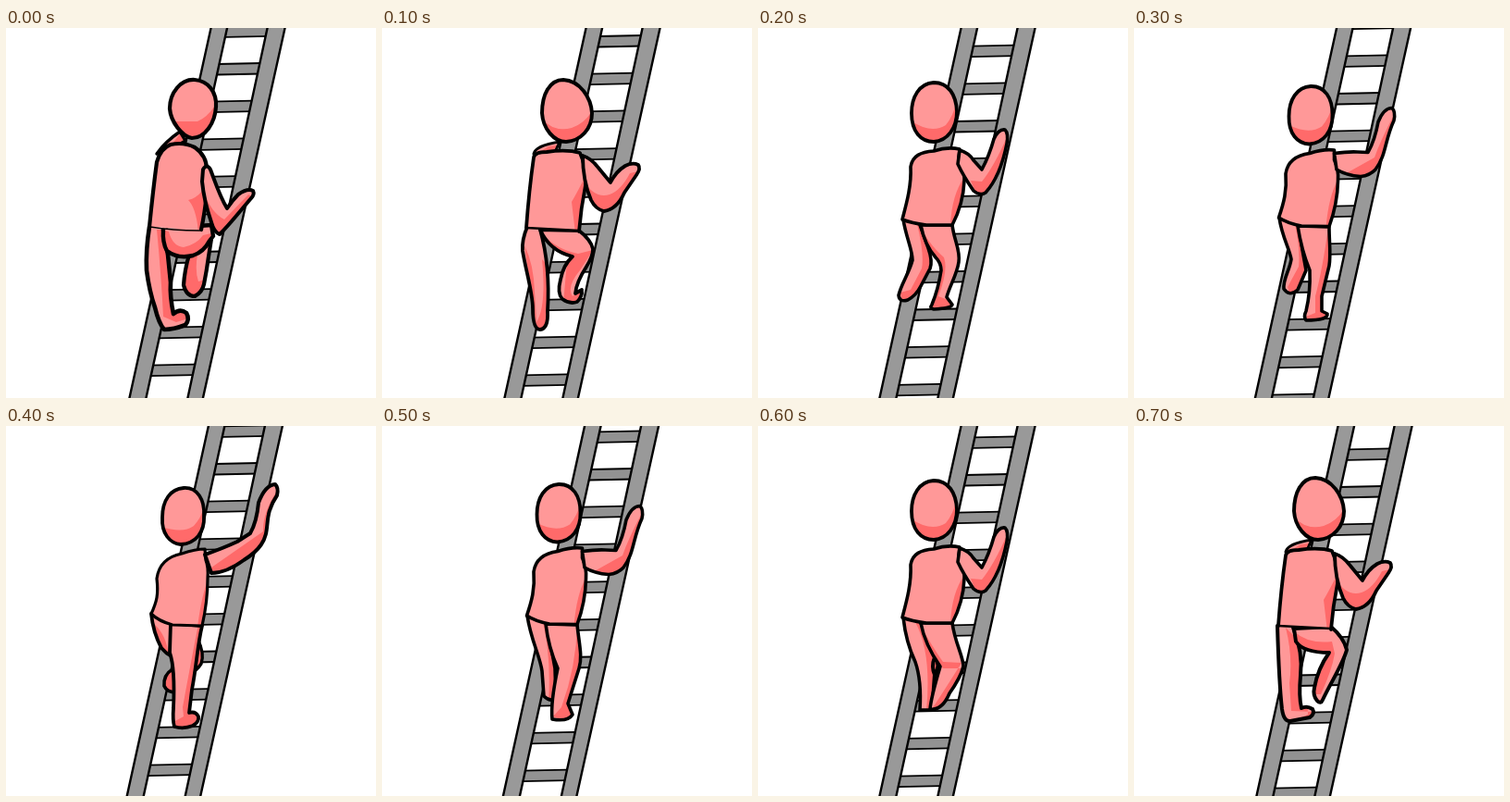
An HTML page with a canvas for the animation above (800 ms loop, 400 by 400 pixels).

```html
<!DOCTYPE html>
<html lang="en">
<head>
<meta charset="utf-8">
<title>Climbing a ladder</title>
<style>
html, body { margin: 0; width: 100%; height: 100%; overflow: hidden; background: #fff; }
canvas { display: block; width: 100vw; height: 100vh; }
</style>
</head>
<body>
<canvas id="stage" width="400" height="400"></canvas>
<script>
const ctx = document.getElementById('stage').getContext('2d');
const SKIN = '#ff9898', SHADE = '#ff6a6a', METAL = '#999', RUNG = '#929292';
const STEP = 100, GAP = 40.7;

// A part is [outline, shade, line width]; the shade is clipped to the outline.
const reach = {
  low: [
    ['M163 136 Q172 123 188 112 L194 122 L180 130', 'M176 130 L190 112 L200 128Z', 3.4],
    ['M155 215 Q159 175 163 145 Q167 130 178 126 Q192 123 204 129 Q217 138 217 153 Q219 180 211 218',
     'M218 160 Q214 182 197 186 Q206 195 208 222 L225 222Z', 4.2],
    ['M156 215 Q180 219 209 219', '', 1.7],
    ['M213 153 Q217 146 221 153 C226 166 231 182 239 195 Q245 186 251 180 Q261 173 267 176 Q269 180 265 184 L249 203 Q239 215 231 223 Q225 221 222 210 Q214 187 212 166 Z',
     'M213 176 Q222 200 236 207 L262 180 L272 184 L232 230 L218 216Z', 4],
    ['M204 56 C189 55 177 70 177 87 C178 101 190 117 201 119 C215 119 226 103 227 85 C228 70 219 57 204 56Z',
     'M179 101 L207 101 Q217 97 226 84 L230 122 L184 122Z', 4.2]
  ],
  bent: [
    ['M164 136 Q166 127 192 123 L188 132', 'M164 138 L180 128 L196 126 L188 140Z', 3],
    ['M156 216 Q159 175 164 140 Q165 134 178 134 Q200 131 214 135 Q221 150 220 170 Q215 195 213 220',
     'M221 158 Q212 176 205 188 L209 222 L224 222Z', 3.8],
    ['M156 216 L213 219', '', 2.4],
    ['M217 138 Q226 141 233 150 L247 167 Q253 155 263 149 Q271 145 277 148 Q280 152 275 159 L262 178 Q254 196 240 198 Q231 196 226 186 Q217 165 217 138Z',
     'M218 165 Q230 185 246 180 Q258 176 268 157 L282 154 L258 202 L228 202Z', 3.8],
    ['M196 56 C181 56 173 72 173 92 C174 109 186 123 199 123 C215 122 227 109 227 92 C226 75 214 57 196 56Z',
     'M172 97 Q185 113 205 108 Q220 103 228 88 L230 126 L175 126Z', 4]
  ],
  mid: [
    ['M165 150 C167 138 176 134 190 133 Q205 128 218 131 L217 140 Q224 155 223 165 Q222 190 210 213 L182 213 Q166 211 156 207 C161 188 166 170 165 150Z',
     'M224 160 Q209 180 208 215 L225 215Z', 3.6],
    ['M218 132 Q228 135 233 143 L242 153 Q250 138 255 120 Q260 109 267 110 Q271 114 269 125 C265 145 258 165 246 178 Q240 182 233 176 Q222 160 216 147Z',
     'M269 118 Q255 150 242 166 L230 165 L240 190 L275 150Z', 3.6],
    ['M190 59 C174 60 166 75 166 92 C166 112 176 123 190 123 C205 122 215 108 215 90 C214 72 206 59 190 59Z',
     'M165 100 Q187 115 203 105 Q211 95 214 82 L220 126 L168 126Z', 3.8]
  ],
  high: [
    ['M163 165 C165 150 175 141 190 138 Q205 133 215 133 L216 145 Q219 152 218 165 Q218 190 212 216 L180 215 Q165 211 157 203 C163 190 165 182 163 165Z',
     'M219 165 Q212 180 207 217 L225 217Z', 3.2],
    ['M215 139 Q235 132 250 125 L264 116 Q271 104 273 83 Q280 64 291 63 Q295 67 293 75 C277 98 287 112 276 128 Q270 137 257 145 Q238 159 222 159Z',
     'M293 70 Q277 95 278 114 L222 153 L222 165 L290 130Z', 4],
    ['M192 67 C178 68 169 80 169 99 C168 116 177 127 189 128 C205 127 215 115 214 97 C215 80 207 66 192 67Z',
     'M166 108 Q190 117 203 108 Q211 99 214 88 L220 130 L168 130Z', 3.8]
  ]
};

// Halfway between two outlines built from the same commands.
function mix(a, b) {
  const nums = b.match(/[\d.]+/g);
  let i = 0;
  return a.replace(/[\d.]+/g, n => (+n + +nums[i++]) / 2);
}
reach.rise = reach.mid.map(([d, s, w], i) =>
  [mix(d, reach.high[i][0]), mix(s, reach.high[i][1]), w]);

const legs = [
  [
    ['M155 215 Q151 240 152 262 Q155 285 161 302 Q165 319 171 326 Q181 326 194 321 Q199 315 195 308 Q188 303 181 309 Q177 290 178 275 L175 245 L170 218',
     'M163 218 Q168 270 170 312 L184 318 L204 312 L182 270 L178 218Z', 4.6],
    ['M198 245 Q193 262 192 278 Q195 290 204 290 Q212 286 214 277 Q217 262 219 247 L222 228',
     'M196 245 L207 245 Q204 262 208 274 L222 270 L222 294 L190 294 L190 262Z', 4.2],
    ['M170 218 Q169 232 174 241 Q186 250 202 246 Q214 242 220 230 L224 225 L222 213 L208 214',
     'M168 218 L176 220 Q180 236 192 237 Q206 234 213 224 L222 222 L220 246 L182 254 L168 240Z', 4.4]
  ],
  [
    ['M157 215 Q151 229 152 241 C155 260 163 286 163 303 Q163 326 171 326 Q180 325 179 306 C181 275 178 243 171 218',
     'M154 235 Q164 255 165 285 L167 318 Q178 300 173 250 L182 260 L184 318 L168 330Z', 3.8],
    ['M171 218 L213 219 Q226 229 228 239 Q228 247 221 258 Q210 275 209 287 L216 283 Q217 290 211 296 Q203 299 195 293 Q189 287 193 272 Q196 256 206 247 Q181 241 171 218Z',
     'M172 222 Q190 240 212 244 L228 240 L214 262 Q199 280 206 290 L214 284 L216 300 L196 298 L200 252Z', 3.8]
  ],
  [
    ['M157 207 C160 226 167 240 167 251 C163 266 155 276 152 289 Q153 297 162 294 Q171 289 176 279 L186 260 Q189 252 184 238 L175 213',
     'M172 212 Q180 245 177 260 L165 283 L154 286 L156 300 L178 286 L193 250 L180 212Z', 3.6],
    ['M176 213 L210 213 C212 230 219 240 217 253 C215 267 207 279 204 291 L210 299 Q209 303 190 304 Q185 303 188 299 Q195 282 198 262 Q198 254 192 248 Q180 234 176 213Z',
     'M177 218 Q187 236 201 248 Q206 262 195 290 L208 295 L212 308 L184 306 L200 258 L180 236Z', 3.6]
  ],
  [
    ['M157 205 C160 226 168 238 170 250 C168 263 161 271 162 282 Q168 291 177 283 L186 262 L182 240 L178 213',
     'M174 212 Q180 240 178 258 L166 280 L170 292 L190 266 L184 212Z', 3.6],
    ['M177 214 L211 215 C211 232 213 244 211 257 L203 290 L203 306 L209 309 Q210 316 186 316 Q183 312 186 306 Q191 285 190 262 Q181 240 177 214Z',
     'M210 215 Q204 260 196 290 L196 308 L186 312 L190 320 L214 314 L216 240Z', 3.6]
  ],
  [
    ['M207 230 Q215 246 211 257 Q206 265 198 268 L198 230', 'M200 225 L216 225 L216 270 L198 270Z', 3.4],
    ['M180 263 Q170 269 171 281 Q174 288 184 288', 'M180 262 L166 272 L174 284 L186 290Z', 3.6],
    ['M157 203 Q159 223 168 240 Q173 246 179 249 L180 213', 'M158 212 Q174 225 176 250 L156 242Z', 3.8],
    ['M178 213 L212 216 C207 236 206 260 201 285 L198 310 Q205 308 208 314 Q209 320 202 324 Q192 328 182 325 Q180 318 181 305 Q183 262 177 245Z',
     'M208 214 Q198 265 191 304 L192 314 L183 319 L184 330 L212 324 L216 214Z', 3.8]
  ],
  [
    ['M157 205 C161 232 171 249 173 265 L175 292 Q182 299 188 294 L187 262 L178 213',
     'M174 212 Q183 250 180 298 L192 298 L190 250 L184 212Z', 3.6],
    ['M177 214 L211 215 C213 235 217 249 213 262 L201 300 L206 312 Q201 320 184 317 Q182 300 190 262 Q180 240 177 214Z',
     'M211 215 Q210 260 194 304 L185 314 L208 322 L220 240Z', 3.6]
  ],
  [
    ['M157 207 Q160 234 170 255 Q177 275 175 307 L188 307 L192 252 L176 213',
     'M170 212 Q188 245 182 308 L192 308 L196 250 L180 212Z', 3.6],
    ['M191 250 Q198 258 191 269 Q187 260 191 250Z', 'M186 248 L200 248 L200 272 L186 272Z', 4],
    ['M176 213 L210 213 C213 235 222 249 222 260 Q219 272 207 289 Q199 308 186 306 Q187 294 197 260 C190 250 180 235 176 213Z',
     'M176 216 Q188 238 200 255 L220 256 Q202 285 188 306 L202 310 L228 262 L200 262 L182 238Z', 3.6]
  ],
  [
    ['M155 216 C156 250 157 280 160 306 Q162 320 169 319 L190 315 Q196 311 193 306 Q187 302 181 305 Q178 292 180 270 Q183 245 172 218',
     'M164 218 Q172 250 168 278 L170 308 L194 309 L194 320 L164 322 L188 312 L186 240Z', 4],
    ['M173 219 L213 217 Q227 229 230 242 C226 257 214 275 204 296 Q202 301 198 297 Q193 291 195 283 C198 266 206 252 211 245 Q183 245 175 233Z',
     'M173 222 Q188 236 214 233 L217 246 Q214 264 202 290 L190 290 L206 246 L180 250Z', 4]
  ]
];

// [upper body, rung travel, ladder sway] for each step
const beats = [
  ['low', 0, 0], ['bent', 10.7, -1], ['mid', 21.3, -2], ['rise', 32, -2.5],
  ['high', 2, -2.7], ['rise', 8, -2.5], ['mid', 14, -2], ['bent', 27, -1]
];

function drawPart([outline, shade, width]) {
  const path = new Path2D(outline);
  ctx.fillStyle = SKIN;
  ctx.fill(path);
  if (shade) {
    ctx.save();
    ctx.clip(path);
    ctx.fillStyle = SHADE;
    ctx.fill(new Path2D(shade));
    ctx.restore();
  }
  ctx.lineWidth = width;
  ctx.stroke(path);
}

function line(x1, y1, x2, y2, width) {
  ctx.lineWidth = width;
  ctx.beginPath();
  ctx.moveTo(x1, y1);
  ctx.lineTo(x2, y2);
  ctx.stroke();
}

function drawRail(l1, r1, l2, r2) {
  ctx.fillStyle = METAL;
  ctx.fill(new Path2D(`M${l1} -2 L${r1} -2 L${r2} 402 L${l2} 402Z`));
  line(l1, -2, l2, 402, 2.4);
  line(r1, -2, r2, 402, 2.4);
}

function drawLadder(travel, sway) {
  ctx.save();
  ctx.translate(sway, 0);
  for (let y = 3.8 - GAP + travel; y < 410; y += GAP) {
    const x1 = 238 - y * 0.22, x2 = 285 - y * 0.22;
    ctx.fillStyle = RUNG;
    ctx.fill(new Path2D(`M${x1} ${y - 5.5} L${x2} ${y - 6.5} L${x2} ${y + 5} L${x1} ${y + 6}Z`));
    line(x1, y - 5.5, x2, y - 6.5, 1.8);
    line(x1, y + 6, x2, y + 5, 1.8);
  }
  drawRail(222, 239.5, 133, 151);
  drawRail(283, 302, 196, 212.5);
  ctx.restore();
}

function draw(step) {
  const [body, travel, sway] = beats[step];
  ctx.fillStyle = '#fff';
  ctx.fillRect(0, 0, 400, 400);
  ctx.strokeStyle = '#000';
  ctx.lineCap = ctx.lineJoin = 'round';
  drawLadder(travel, sway);
  legs[step].forEach(drawPart);
  reach[body].forEach(drawPart);
}

const start = performance.now();
function tick() {
  draw(Math.floor((performance.now() - start) / STEP) % beats.length);
  requestAnimationFrame(tick);
}
tick();
</script>
</body>
</html>
```
